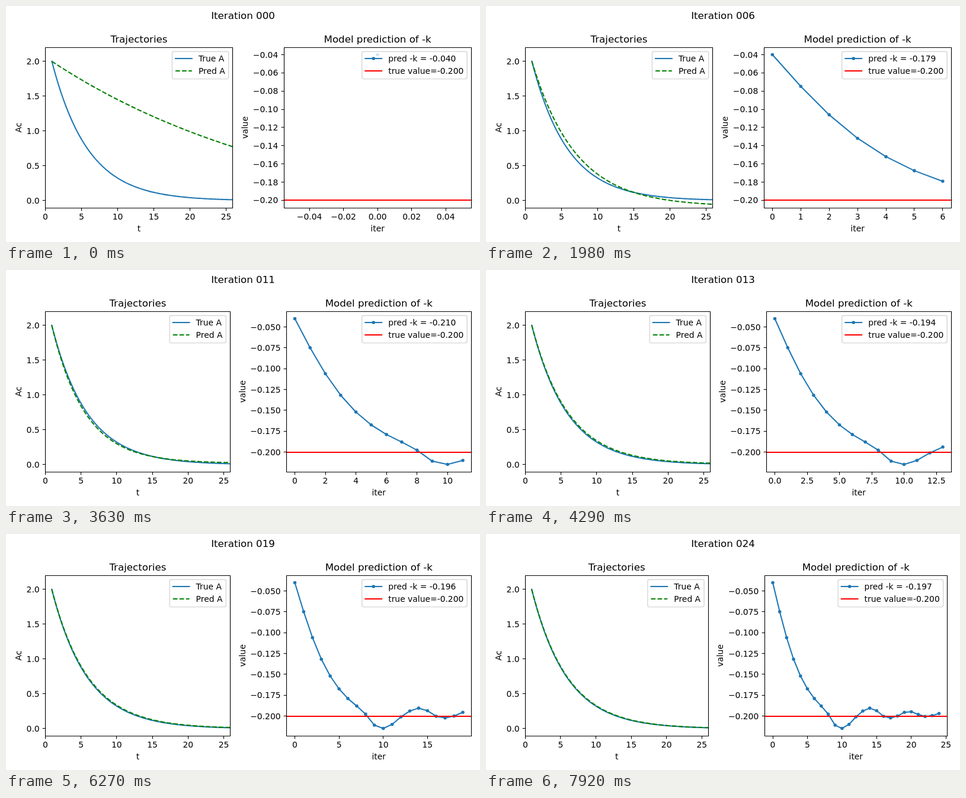
Animation of 800x400 px, one loop 8000 ms. Source, as an HTML page with a canvas:

```html
<!DOCTYPE html>
<html lang="en">
<head>
<meta charset="utf-8">
<title>Model fitting</title>
<style>
  html, body { margin: 0; width: 100%; height: 100%; overflow: hidden; background: #fff; }
  canvas { display: block; }
</style>
</head>
<body>
<canvas id="stage" width="800" height="400"></canvas>
<script>
const ctx = document.getElementById('stage').getContext('2d');

const STEP_MS = 330, LOOP_MS = 8000;
const TOP = 70.2, BOTTOM = 341.8;
const SMALL = 13.889, LARGE = 16.667, TICK = 4.86, LINE = 2.083;
const BLUE = '#1f77b4', GREEN = '#008000', RED = '#ff0000';
const TRUE_K = 0.2, T_START = 0.9, T_END = 25.9;

// Predicted rate and the level the predicted curve decays to, per iteration.
const rates = [.04, .0748, .106, .1318, .152, .1674, .179, .188, .1977, .211, .2148, .21, .201,
  .194, .1905, .1936, .2003, .2022, .2, .1955, .1948, .198, .2005, .1994, .197];
const levels = [-.4, -.41, -.38, -.32, -.245, -.155, -.085, -.02, .016, .026, .026, .021, .013,
  .007, .004, .003, .004, .004, .003, .002, .001, .001, .001, 0, 0];

const snap = v => Math.floor(v) + 0.5;

function text(str, x, y, align = 'center', size = SMALL) {
  ctx.font = `${size}px "DejaVu Sans", sans-serif`;
  ctx.textAlign = align;
  ctx.fillStyle = '#000';
  ctx.fillText(str, x, y);
}

function polyline(points, color, width = LINE, dash = []) {
  ctx.beginPath();
  points.forEach(([x, y]) => ctx.lineTo(x, y));
  ctx.strokeStyle = color;
  ctx.lineWidth = width;
  ctx.lineJoin = 'round';
  ctx.lineCap = dash.length || width < 2 ? 'butt' : 'square';
  ctx.setLineDash(dash);
  ctx.stroke();
  ctx.setLineDash([]);
}

function dot(x, y) {
  ctx.beginPath();
  ctx.arc(x, y, 2.78, 0, 2 * Math.PI);
  ctx.fillStyle = BLUE;
  ctx.fill();
}

const dashed = [LINE * 3.7, LINE * 1.6];

function makeAxes(left, right, xlim, ylim) {
  return {
    left, right, xlim, ylim,
    x: v => left + (v - xlim[0]) / (xlim[1] - xlim[0]) * (right - left),
    y: v => BOTTOM - (v - ylim[0]) / (ylim[1] - ylim[0]) * (BOTTOM - TOP),
  };
}

// Round tick values giving at most `bins` intervals, with their labels.
function ticks([lo, hi], bins) {
  const raw = (hi - lo) / bins;
  const power = 10 ** Math.floor(Math.log10(raw));
  const step = +([1, 2, 2.5, 5, 10].find(s => s * power >= raw) * power).toPrecision(3);
  const decimals = (String(step).split('.')[1] || '').length;
  const list = [];
  for (let n = Math.ceil(lo / step); n * step <= hi; n++) {
    list.push([n * step, (n * step).toFixed(decimals).replace('-', '\u2212')]);
  }
  return list;
}

function clipped(axes, paint) {
  ctx.save();
  ctx.beginPath();
  ctx.rect(axes.left, TOP, axes.right - axes.left, BOTTOM - TOP + 0.5);
  ctx.clip();
  paint();
  ctx.restore();
}

function frame(axes, title, xLabel, yLabel, yLabelX, yBins) {
  const { left, right } = axes, middle = (left + right) / 2, base = 342.5;
  for (const [v, label] of ticks(axes.xlim, 7)) {
    const x = axes.x(v);
    polyline([[snap(x), base], [snap(x), base + TICK]], '#000', 1.11);
    text(label, x, 362);
  }
  for (const [v, label] of ticks(axes.ylim, yBins)) {
    const y = axes.y(v);
    polyline([[snap(left), snap(y)], [snap(left) - TICK, snap(y)]], '#000', 1.11);
    text(label, left - 9.72, y + 5, 'right');
  }
  ctx.lineWidth = 1.11;
  ctx.strokeStyle = '#000';
  ctx.strokeRect(snap(left), 70.5, snap(right) - snap(left), base - 70.5);
  text(title, middle, 62, 'center', LARGE);
  text(xLabel, middle, 382);
  ctx.save();
  ctx.translate(yLabelX, 206);
  ctx.rotate(-Math.PI / 2);
  text(yLabel, 0, 0);
  ctx.restore();
}

function legend(axes, width, entries) {
  const right = axes.right - 6.94, left = right - width;
  ctx.beginPath();
  ctx.roundRect(left, 77.3, width, 46.3, 2.78);
  ctx.fillStyle = 'rgba(255,255,255,.8)';
  ctx.fill();
  ctx.strokeStyle = 'rgba(204,204,204,.8)';
  ctx.lineWidth = 1.39;
  ctx.stroke();
  entries.forEach(([label, color, dash, marker], row) => {
    const y = 89 + row * 21, x = left + 5.56;
    polyline([[x, y], [x + 27.78, y]], color, LINE, dash);
    if (marker) dot(x + 13.89, y);
    text(label, x + 38.9, y + 5, 'left');
  });
}

function decay(axes, rate, level) {
  return Array.from({ length: 101 }, (_, i) => {
    const elapsed = (T_END - T_START) * i / 100;
    return [axes.x(T_START + elapsed), axes.y(level + (2 - level) * Math.exp(-rate * elapsed))];
  });
}

function drawTrajectories(iter, right) {
  const axes = makeAxes(66.4, right, [0, T_END], [-0.1, 2.2]);
  const level = levels[iter];
  clipped(axes, () => {
    polyline(decay(axes, TRUE_K, 0), BLUE);
    polyline(decay(axes, rates[iter] / (1 - level), level), GREEN, LINE, dashed);
  });
  frame(axes, 'Trajectories', 't', 'Ac', 25.5, 5);
  legend(axes, 95.2, [['True A', BLUE, []], ['Pred A', GREEN, dashed]]);
}

function drawPrediction(iter, left, right, labelX) {
  const seen = rates.slice(0, iter + 1);
  const first = rates[0];
  let most = Math.max(...seen);
  if (most + (most - first) * 0.05 < TRUE_K) most = TRUE_K;
  const yPad = (most - first) * 0.05, xPad = iter ? iter * 0.05 : 0.055;
  const axes = makeAxes(left, right, [-xPad, iter + xPad], [-most - yPad, -first + yPad]);
  const points = seen.map((k, i) => [axes.x(i), axes.y(-k)]);
  const trueY = Math.round(axes.y(-TRUE_K));
  clipped(axes, () => {
    if (iter) polyline(points, BLUE);
    points.forEach(p => dot(...p));
    polyline([[left, trueY], [right, trueY]], RED);
  });
  frame(axes, 'Model prediction of -k', 'iter', 'value', labelX, 9);
  legend(axes, 177.5, [
    [`pred -k = -${rates[iter].toFixed(3)}`, BLUE, [], true],
    ['true value=-0.200', RED, []],
  ]);
}

function draw(iter) {
  ctx.fillStyle = '#fff';
  ctx.fillRect(0, 0, 800, 400);
  text(`Iteration ${String(iter).padStart(3, '0')}`, 400, 22, 'center', LARGE);

  // Longer y labels widen the gap; an overhanging x label pulls the right edge in.
  const wide = iter >= 9;
  const gap = wide ? 95 : 86.4;
  const right = 785.2 - ({ 12: 13.2, 24: 6.6 }[iter] || 0);
  const width = (right - 66.4 - gap) / 2;
  drawTrajectories(iter, 66.4 + width);
  drawPrediction(iter, right - width, right, right - width - (wide ? 69.7 : 60.6));
}

let shown = -1;
function tick() {
  const iter = Math.floor(performance.now() % LOOP_MS / STEP_MS);
  if (iter !== shown) draw(shown = iter);
  requestAnimationFrame(tick);
}
tick();
</script>
</body>
</html>
```
